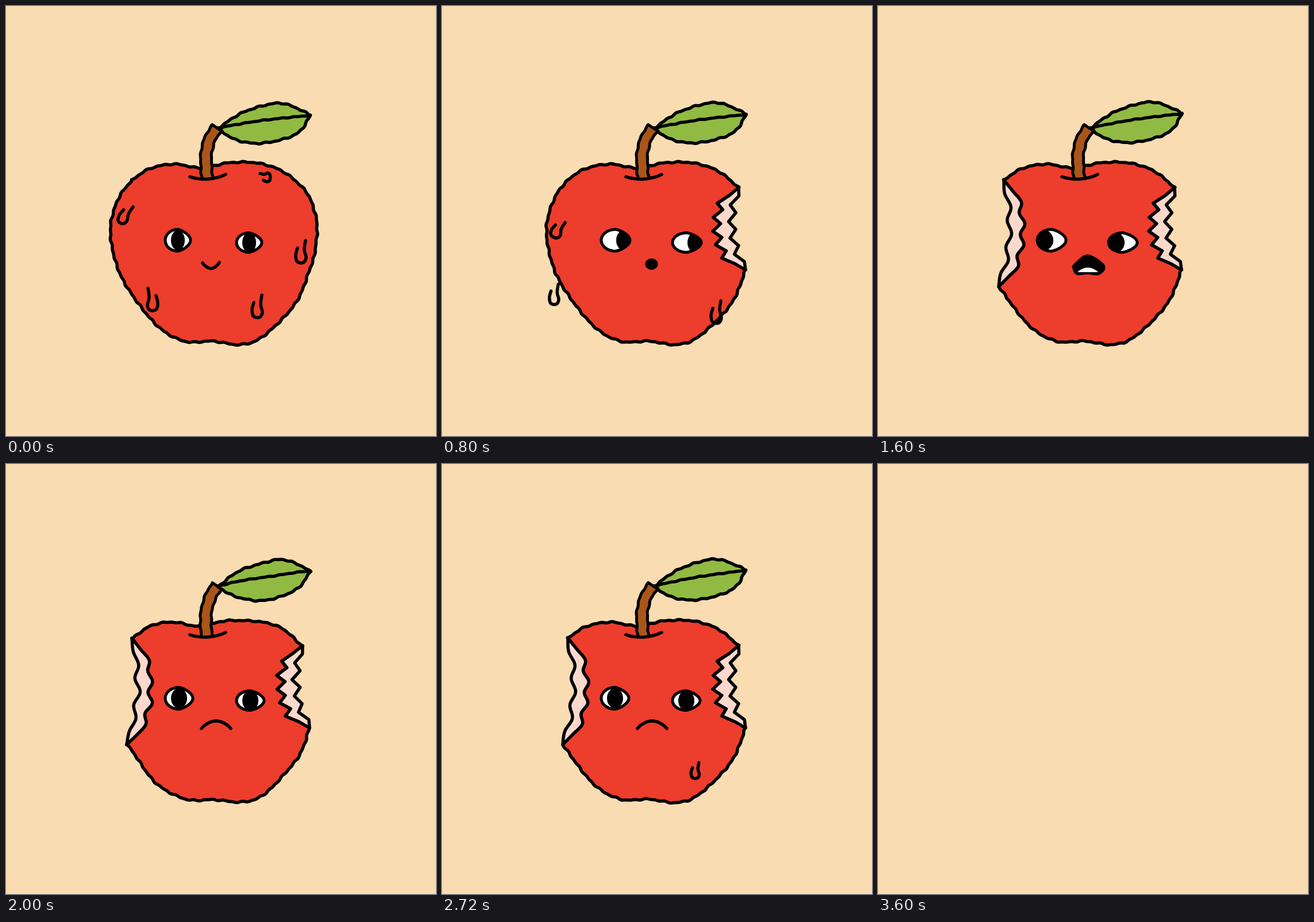
Write an HTML page with a canvas that moves like this. It is 748x748 px and loops after 3.73 s.

```html
<!DOCTYPE html>
<html lang="en">
<head>
<meta charset="utf-8">
<title>Eaten apple</title>
<style>
  html, body { margin: 0; width: 100%; height: 100%; overflow: hidden; background: #f9dcb2; }
  canvas { display: block; }
</style>
</head>
<body>
<canvas id="stage" width="748" height="748"></canvas>
<script>
const ctx = document.getElementById('stage').getContext('2d');
const LOOP = 3730, STEP = 80, LAST = 45;
const PAPER = '#f9dcb2', RED = '#ed3d2c', FLESH = '#fad9cc', GREEN = '#91ba43', BROWN = '#aa5519';
const INK = '#000', WHITE = '#fff';
// Steps at which the apple is bitten and turns sad.
const BITE1 = 8, BITE2 = 14, SAD = 25, BITE3 = 35;

let odd = 0;

const points = text => text.split(' ').map(p => p.split(',').map(Number));

// Catmull-Rom spline through the key points.
function smooth(pts) {
  const out = [], at = i => pts[Math.max(0, Math.min(pts.length - 1, i))];
  for (let i = 0; i < pts.length - 1; i++) {
    const [a, b, c, d] = [at(i - 1), at(i), at(i + 1), at(i + 2)];
    const n = Math.ceil(Math.hypot(c[0] - b[0], c[1] - b[1]) / 3);
    for (let j = 0; j < n; j++) {
      const t = j / n;
      out.push([0, 1].map(k => b[k] + t / 2 * (c[k] - a[k] +
        t * (2 * a[k] - 5 * b[k] + 4 * c[k] - d[k] + t * (3 * (b[k] - c[k]) + d[k] - a[k])))));
    }
  }
  out.push(at(pts.length));
  return out;
}

// Moves every point along the normal by push(length so far).
function shift(pts, push) {
  let length = 0;
  return pts.map((p, i) => {
    const a = pts[Math.max(0, i - 1)], b = pts[Math.min(pts.length - 1, i + 1)];
    const dx = b[0] - a[0], dy = b[1] - a[1], d = Math.hypot(dx, dy) || 1;
    length += Math.hypot(p[0] - a[0], p[1] - a[1]);
    const by = push(length) / d;
    return [p[0] - dy * by, p[1] + dx * by];
  });
}

// Hand-drawn unevenness, alternating between two versions.
function wobble(pts, amount = 1) {
  const phase = pts[0][0] + odd * 2.6;
  return shift(pts, s => amount * (Math.sin(s / 2.7 + phase) * .6 + Math.sin(s / 4.6 + phase * 2) * .6 +
    odd * Math.sin(s / 17 + phase)));
}

const curve = (pts, amount) => wobble(smooth(pts), amount);

// A line from one point to another that bulges by depth, with optional teeth.
function edge([x0, y0], [x1, y1], depth, jag = 0, n = 12, power = .8) {
  const dx = x1 - x0, dy = y1 - y0, len = Math.hypot(dx, dy);
  return Array.from({ length: n + 1 }, (_, i) => {
    const t = i / n, inner = i && i < n;
    const tooth = inner && jag ? jag * (-1) ** i + odd * Math.sin(i * 2) : 0;
    const push = (depth * Math.sin(Math.PI * t) ** power + tooth) / len;
    return [x0 + dx * t - dy * push, y0 + dy * t + dx * push];
  });
}

function paint(pts, fill, close = !!fill, width = 5.5) {
  ctx.beginPath();
  pts.forEach(p => ctx.lineTo(...p));
  if (close) ctx.closePath();
  if (fill) { ctx.fillStyle = fill; ctx.fill(); }
  if (width) { ctx.lineWidth = width; ctx.stroke(); }
}

function oval(x, y, rx, ry, turn = 0) {
  ctx.fillStyle = INK;
  ctx.beginPath();
  ctx.ellipse(x, y, rx, ry, turn, 0, 7);
  ctx.fill();
}

function placed(x, y, turn, draw) {
  ctx.save();
  ctx.translate(x, y);
  ctx.rotate(turn);
  draw();
  ctx.restore();
}

// The outline runs clockwise in four parts; a bite replaces a side.
const TOP = points('219,303 250,283 293,275 340,282 385,273 436,273 480,287 516,316');
const RIGHT = points('531,340 541,380 537,430');
const BOTTOM = points('528,459 503,518 448,574 408,589 360,583 310,583 262,555 210,488');
const LEFT = points('188,435 182,382 196,334');

function body(f) {
  if (f < BITE1) return paint(curve([...TOP, ...RIGHT, ...BOTTOM, ...LEFT, TOP[0]]), RED);
  const [leftTop, rightTop, rightEnd, leftEnd] = [TOP[0], TOP.at(-1), BOTTOM[0], BOTTOM.at(-1)];
  const rightBite = edge(rightTop, rightEnd, 44, 7, 12, .45);
  const rightFlesh = edge(rightTop, rightEnd, 17, 6, 10).reverse();
  if (f < BITE2) {
    paint([...curve([...BOTTOM, ...LEFT, ...TOP]), ...rightBite], RED);
  } else {
    const leftBite = smooth(edge(leftEnd, leftTop, 37, 4, 10, .5));
    const leftFlesh = smooth(edge(leftEnd, leftTop, 14, 4, 8)).reverse();
    paint([...curve(TOP), ...rightBite, ...curve(BOTTOM), ...leftBite], RED);
    paint([...leftBite, ...leftFlesh], FLESH);
  }
  paint([...rightBite, ...rightFlesh], FLESH);
}

function core() {
  const left = points('298,312 304,360 320,412 305,495 298,556');
  const right = points('416,562 405,518 388,460 381,405 400,306');
  paint([...curve(left, 1.6), ...curve(right, 1.6)], FLESH);
  paint([...curve(points('278,277 330,275 385,270 427,268')),
    ...edge([427, 268], [278, 277], -46, 5, 16, .5)], RED);
  paint([...curve(points('277,563 304,554 360,557 417,562 450,570')),
    ...curve(points('450,570 400,589 345,581 300,578 277,563'))], RED);
  points('342,388 366,398 348,415 340,442 363,435')
    .forEach(([x, y], i) => oval(x, y, 5.7, 8.7, i % 2 ? -.35 : .45));
}

function stemAndLeaf(f) {
  const middle = smooth(points('350,299 348,262 354,233 367,212'));
  const side = by => wobble(shift(middle, () => by), .8);
  paint([...side(-9.5), ...side(9.5).reverse()], BROWN, false, 5);
  paint(edge([320, 297], [382, 293], 6));
  placed(369, 213, .02 - f * .001, () => {
    paint([...curve(points('0,0 43,-29 101,-46 136,-38 160,-26')),
      ...curve(points('160,-26 136,7 78,24 31,19 0,0'))], GREEN);
    paint(curve(points('0,-1 73,-15 160,-26'), .6));
  });
}

// Round on the left, tapering to the right.
function eye(x, y, rx, ry, look, pupil) {
  const lid = Array.from({ length: 40 }, (_, i) => {
    const u = Math.cos(i * Math.PI / 20), v = Math.sin(i * Math.PI / 20);
    return [x + rx * u, y + ry * v * (1 - .25 * Math.max(0, u))];
  });
  paint(lid, WHITE, true, 0);
  ctx.save();
  ctx.clip();
  oval(x + look, y, pupil, 17.5);
  ctx.restore();
  paint(lid, null, true, 5);
}

function face(f) {
  const [rx, look, pupil] = f < BITE1 ? [22, 0, 12] : f < BITE2 ? [25, 14, 13] : f < SAD ? [25, -13, 16] : [24, 0, 14];
  eye(277 + rx, 407.5, rx, 19, look, pupil);
  eye(401 + rx, 411.5, rx, 17, look, pupil);
  if (f < BITE1) {
    paint(edge([342, 447], [371, 446], 10));
  } else if (f < BITE2) {
    oval(364.5, 449, 11, 10);
  } else if (f < SAD) {
    paint(smooth(points('340,453 364,435 392,452 384,465 364,464 346,465 340,453')), INK);
    paint(edge([347, 463], [383, 463], -8), WHITE, true, 0);
  } else {
    paint(edge([340, 460], [391, 460], -13));
  }
}

const DROP = smooth(points('8,-22 6,-6 9,7 6,15 0,17 -7,14 -9,3 -6,-9'));

function drops(f) {
  // Each drop straightens up as it falls.
  const fall = (start, end, x, y, vx, vy, turn = 0, w = 1, h = 1) => {
    const age = f - start;
    if (age < 0 || f >= end) return;
    placed(x + vx * age, y + vy * age, turn * Math.max(0, 1 - age / 10), () =>
      paint(DROP.map(([u, v]) => [u * w, v * h])));
  };
  fall(0, BITE2, 206, 364, -1.1, 14, .45, .9, .9);
  fall(0, BITE2, 513, 430, -3.6, 10.5);
  fall(0, 5, 255, 513, 3, 11, 0, -1);
  fall(0, 5, 437, 525, -3, 9);
  fall(0, BITE1, 452, 298, 3, 12, -1.57, .85, .45);
  fall(BITE1, BITE2, 200, 362, 0, 14, .5, 1, .8);
  fall(28, BITE3, 435, 418, .9, 19.5, 0, .8, .7);
}

function crumbs(x, y, side, age, spread) {
  for (let i = 0; i < 6; i++) {
    const out = 8 + (i * 17 % 31) + age * 7, down = (i - 2.5) * spread + age * 10;
    placed(x + side * out, y + down, i * 1.3 + age, () =>
      paint(points('-6,-4 3,-6 6,3 -3,6'), i % 2 ? FLESH : RED, true, 4.5));
  }
}

function bites(f) {
  const burst = (start, length, draw) => { if (f >= start && f < start + length) draw(f - start); };
  burst(BITE1, 2, age => crumbs(526, 400, 1, age, 30));
  burst(BITE2, 2, age => crumbs(198, 400, -1, age, 26));
  burst(BITE3, 1, age => [-1, 1].forEach(side => crumbs(366 + side * 160, 480, side, age, 60)));
}

function draw() {
  const f = Math.min(LAST, Math.floor(performance.now() % LOOP / STEP));
  odd = f % 2;
  ctx.fillStyle = PAPER;
  ctx.fillRect(0, 0, 748, 748);
  ctx.strokeStyle = INK;
  ctx.lineJoin = ctx.lineCap = 'round';
  if (f < LAST) {
    if (f < BITE3) {
      body(f);
      face(f);
      drops(f);
    } else {
      core();
    }
    stemAndLeaf(f);
    bites(f);
  }
  requestAnimationFrame(draw);
}
draw();
</script>
</body>
</html>
```
